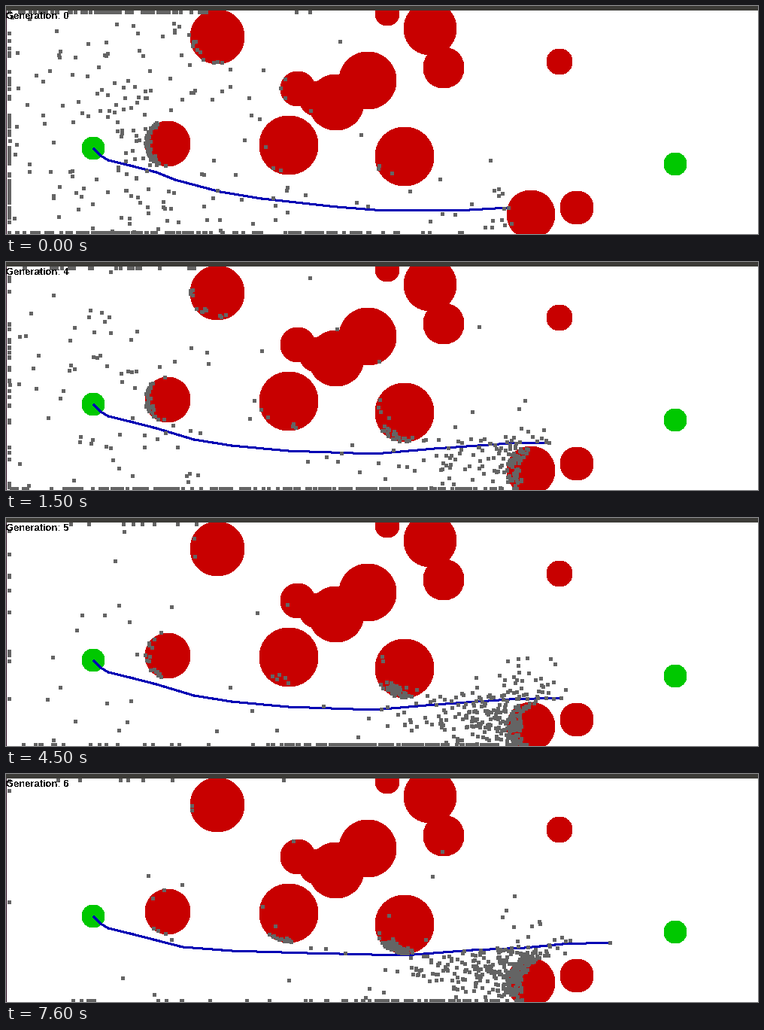
Recreate the animation shown at these times as a matplotlib script. Size 1000 px wide and 303 px high, loop 8000 ms.

```python
import numpy as np
import matplotlib.pyplot as plt
from matplotlib.animation import FuncAnimation
from matplotlib.collections import PolyCollection
from matplotlib.patches import Circle, Rectangle

W, H, DPI = 1000, 303, 100
PX = 72 / DPI
RED, GREEN, BLUE, GRAY = "#c80000", "#00c800", "#0000b4", "#646464"
COUNT = 550
SUBSTEPS = 4
TOP_SPEED_AT = 5.2

OBSTACLES = np.array([
    (281, 41, 36), (507, 10, 16), (564, 30, 35), (582, 82, 27),
    (736, 74, 17), (481, 99, 38), (439, 128, 37), (413, 123, 23),
    (388, 110, 23), (215, 183, 30), (376, 185, 39),
    (530, 200, 39), (698, 277, 32), (759, 268, 22),
])
LOW, HIGH = (4, 8), (W, 301)

rng = np.random.default_rng(11)


def progress(t, steps):
    """Steady acceleration up to a top speed, scaled to end at 1."""
    def run(u):
        c = TOP_SPEED_AT
        return u * u if u < c else 2 * c * u - c * c
    return run(min(t, steps)) / run(steps)


def blocked(pts):
    off = pts[:, None] - OBSTACLES[:, :2]
    hit = (np.hypot(off[..., 0], off[..., 1]) < OBSTACLES[:, 2]).any(axis=1)
    return hit | ((pts <= LOW) | (pts >= HIGH)).any(axis=1)


class Generation:
    """Wanderers scatter from the start; followers keep near the best path
    and leave it at a random point. Every dot stops where it hits something."""

    def __init__(self, number, first, steps, wander, path):
        self.number, self.first, self.steps = number, first, steps
        self.path = np.array([(117, 190), (126, 199), (136, 205), (165, 212),
                              (200, 221)] + path, float)
        seg = np.hypot(*np.diff(self.path, axis=0).T)
        self.arc = np.concatenate(([0], np.cumsum(seg)))
        self.length = self.arc[-1]
        self.history = self.simulate(wander)

    def at(self, s):
        return np.column_stack([np.interp(s, self.arc, c) for c in self.path.T])

    def simulate(self, wander):
        n = COUNT
        free = rng.random(n) < wander
        follow_reach = rng.normal(605, 35, n) - rng.exponential(45, n)
        reach = np.where(free, rng.uniform(40, 430, n), follow_reach)
        reach = np.clip(reach, 40, 0.98 * self.length)
        loyalty = max(1, 0.55 * self.number)
        leave = np.where(free, 0, self.length * rng.random(n) ** (1 / loyalty))
        heading = np.where(free, rng.normal(0.1, 1.6, n),
                           rng.normal(0.15, 0.45, n))
        turn = np.where(free, rng.normal(0, 1, n), 0)
        drift = rng.normal((0, 25), (15, 28), (n, 2))

        # the best dot runs the whole path
        reach[-1] = leave[-1] = self.length
        drift[-1] = 0

        pos = self.at(np.zeros(n))
        alive = np.ones(n, bool)
        history, before = [pos.copy()], 0
        for i in range(1, self.steps * SUBSTEPS + 1):
            p = progress(i / SUBSTEPS, self.steps)
            s = reach * p
            on_path = self.at(s) + drift * (s / self.length)[:, None] ** 0.8
            a = heading + turn * p
            move = (reach * (p - before))[:, None] * np.column_stack(
                (np.cos(a), np.sin(a)))
            target = np.where((s <= leave)[:, None], on_path, pos + move)
            pos = np.where(alive[:, None], np.clip(target, LOW, HIGH), pos)
            alive &= ~blocked(pos)
            before = p
            if i % SUBSTEPS == 0:
                history.append(pos.copy())
        return history

    def trail(self, step):
        s = self.length * progress(step, self.steps)
        return self.at(np.append(self.arc[self.arc < s], s))


lower = [(250, 236), (300, 244), (375, 251), (490, 255), (570, 248), (670, 241)]
generations = [
    Generation(0, 0, 11, 0.88,
               [(225, 231), (285, 247), (340, 256), (440, 267), (490, 271),
                (600, 272), (668, 268)]),
    Generation(4, 4, 11, 0.42, lower + [(722, 240)]),
    Generation(5, 35, 10, 0.13, lower + [(738, 239)]),
    Generation(6, 66, 10, 0.05,
               [(235, 230), (300, 235), (400, 238), (530, 241), (620, 234),
                (690, 231), (740, 226), (803, 224)]),
]

fig = plt.figure(figsize=(W / DPI, H / DPI), dpi=DPI, facecolor="white")
ax = fig.add_axes([0, 0, 1, 1])
ax.set_xlim(0, W)
ax.set_ylim(H, 0)
ax.axis("off")


def disc(x, y, r, color):
    ax.add_patch(Circle((x, y), r, fc=color, lw=0, antialiased=False, zorder=1))


for x, y, r in OBSTACLES:
    disc(x, y, r, RED)
disc(116, 189, 15, GREEN)
disc(890, 210, 15, GREEN)
ax.add_patch(Rectangle((0, 0), W, 6, fc="#3c3b37", lw=0, zorder=6))
ax.add_patch(Rectangle((0, 6), 1, H, fc="#2c0b22", lw=0, zorder=6))

SQUARE = np.array([(-2, -2), (3, -2), (3, 3), (-2, 3)])
line, = ax.plot([], [], color=BLUE, lw=2 * PX, antialiased=False, zorder=2)
dots = PolyCollection([], facecolors=GRAY, linewidths=0, antialiaseds=False,
                      zorder=3)
ax.add_collection(dots, autolim=False)
label = ax.text(0, 17, "", family="Liberation Sans", weight="bold",
                size=13 * PX, va="baseline", antialiased=False, zorder=4)


def draw(frame):
    gen = [g for g in generations if g.first <= frame][-1]
    step = gen.steps if gen.number == 0 else min(frame - gen.first, gen.steps)
    line.set_data(*gen.trail(step).T)
    dots.set_verts(np.floor(gen.history[step])[:, None] + SQUARE)
    label.set_text(f"Generation: {gen.number}")
    return line, dots, label


anim = FuncAnimation(fig, draw, frames=80, interval=100, repeat=True,
                     repeat_delay=0)
plt.show()
```
